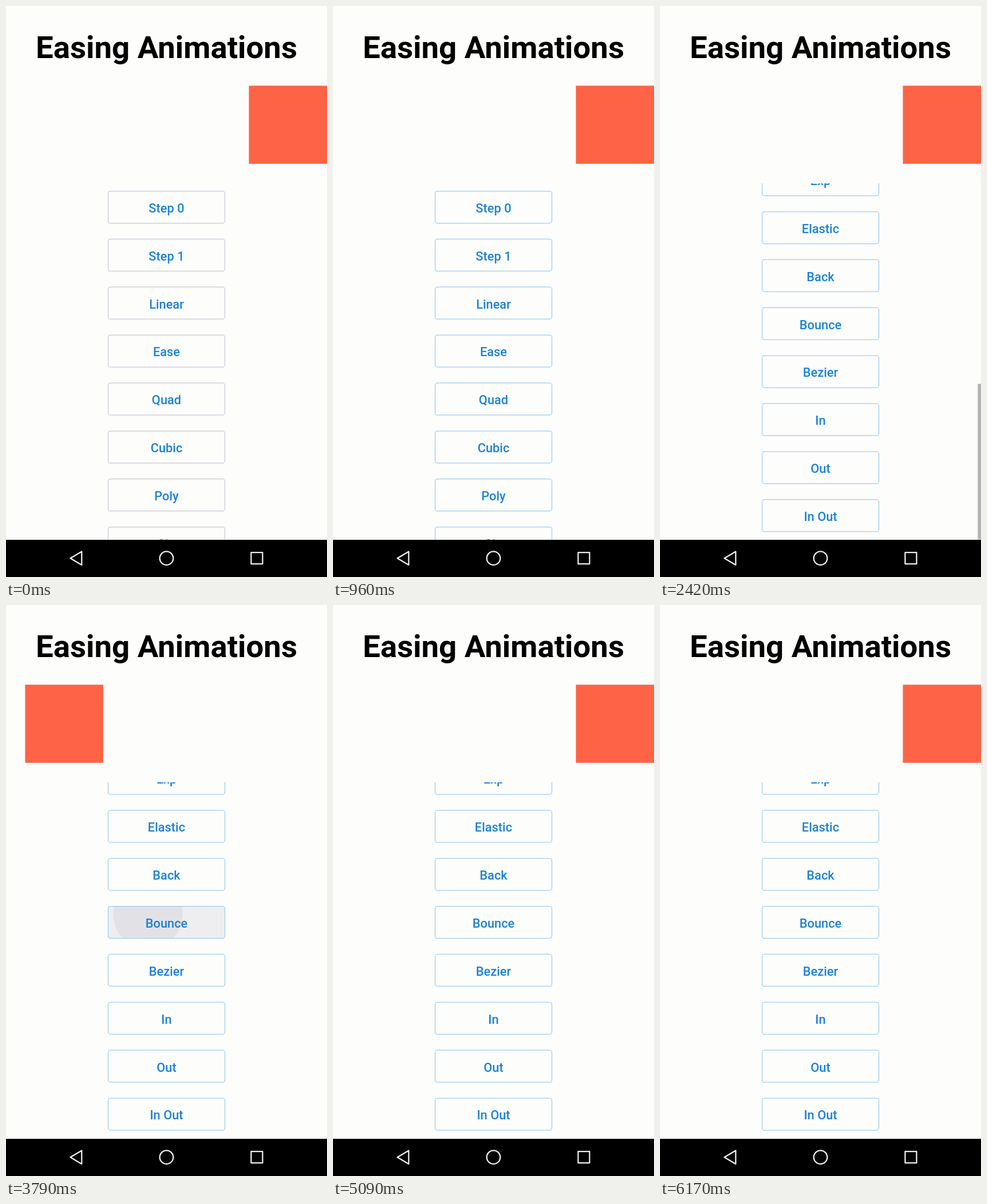
Animation, 561 px wide and 998 px high, one loop 6.21 s. Source, as an HTML page with a canvas:

```html
<!DOCTYPE html>
<html lang="en">
<head>
<meta charset="utf-8">
<title>Easing Animations</title>
<style>
html, body { margin: 0; width: 100%; height: 100%; overflow: hidden; background: #fdfdfc; }
canvas { display: block; width: 561px; height: 998px; }
</style>
</head>
<body>
<canvas id="stage" width="561" height="998"></canvas>
<script>
const ctx = document.getElementById('stage').getContext('2d');
const W = 561, H = 998, LOOP = 6210;
const LIST = { top: 310, bottom: 933, content: 1427, max: 803.2 };
const BUTTON = { x: 178, y: 323, w: 205, h: 57, pitch: 83.86, radius: 4 };
const BOX = { size: 136.5, y: 139.3, travel: 424.5, duration: 1000 };
const LABELS = ['Step 0', 'Step 1', 'Linear', 'Ease', 'Quad', 'Cubic', 'Poly', 'Sin',
  'Circle', 'Exp', 'Elastic', 'Back', 'Bounce', 'Bezier', 'In', 'Out', 'In Out'];

const clamp = v => Math.max(0, Math.min(1, v));
const progress = (t, from, to) => clamp((t - from) / (to - from));
const mix = (a, b, k) => a + (b - a) * k;
const smooth = k => k * k * (3 - 2 * k);
const easeOut = k => 1 - (1 - k) ** 3;

function bounce(k) {
  for (const [limit, shift, base] of [[1, 0, 0], [2, 1.5, 0.75], [2.5, 2.25, 0.9375]]) {
    if (k < limit / 2.75) return 7.5625 * (k - shift / 2.75) ** 2 + base;
  }
  return 7.5625 * (k - 2.625 / 2.75) ** 2 + 0.984375;
}

const elastic = k => 1 - Math.cos(k * Math.PI / 2) ** 3 * Math.cos(k * Math.PI);

const TAPS = [
  { label: 'Bounce', press: 3620, start: 3689, ease: bounce },
  { label: 'Elastic', press: 5100, start: 5138, ease: elastic }
];

function scrollAt(t) {
  if (t < 2210) return 420 * smooth(progress(t, 1420, 1960));
  return mix(420, 802.6, easeOut(progress(t, 2210, 2410))) +
    (LIST.max - 802.6) * progress(t, 2430, 2530);
}

function boxX(t) {
  const tap = TAPS.filter(item => t >= item.start).pop();
  return BOX.travel * (tap ? tap.ease(clamp((t - tap.start) / BOX.duration)) : 1);
}

function text(label, y, size, weight, color) {
  ctx.font = `${weight} ${size}px Roboto, sans-serif`;
  ctx.textAlign = 'center';
  ctx.fillStyle = color;
  ctx.fillText(label, W / 2, y);
}

function drawRipple(y, age) {
  const fade = 1 - progress(age, 190, 480);
  if (age < 0 || fade === 0) return;
  const reach = clamp(age / 400);
  ctx.save();
  ctx.clip();
  ctx.fillStyle = `rgba(60, 60, 110, ${0.075 * fade * progress(age, 0, 90)})`;
  ctx.fillRect(BUTTON.x, y, BUTTON.w, BUTTON.h);
  ctx.fillStyle = `rgba(60, 60, 80, ${0.065 * fade})`;
  ctx.beginPath();
  ctx.arc(mix(219, 287, reach), y + mix(6, 28, reach), mix(15, 121, reach), 0, Math.PI * 2);
  ctx.fill();
  ctx.restore();
}

function drawButton(label, y, t) {
  const settle = progress(t, 40, 630);
  ctx.beginPath();
  ctx.roundRect(BUTTON.x + 0.5, y + 0.5, BUTTON.w - 1, BUTTON.h - 1, BUTTON.radius);
  const tap = TAPS.find(item => item.label === label);
  if (tap) {
    drawRipple(y, t - tap.press);
    ctx.beginPath();
    ctx.roundRect(BUTTON.x + 0.5, y + 0.5, BUTTON.w - 1, BUTTON.h - 1, BUTTON.radius);
  }
  ctx.strokeStyle = `rgb(${mix(205, 160, settle)}, ${mix(198, 204, settle)}, ${mix(210, 239, settle)})`;
  ctx.lineWidth = 1.25;
  ctx.stroke();
  text(label, y + 37.8, 21.82, 500, '#1a82d7');
}

function drawList(t) {
  const scroll = scrollAt(t), view = LIST.bottom - LIST.top;
  ctx.save();
  ctx.beginPath();
  ctx.rect(0, LIST.top, W, view);
  ctx.clip();
  LABELS.forEach((label, i) => {
    const y = BUTTON.y + i * BUTTON.pitch - scroll;
    if (y < LIST.bottom && y + BUTTON.h > LIST.top) drawButton(label, y, t);
  });
  if (t >= 1420) {
    ctx.globalAlpha = 1 - progress(t, 2790, 3040);
    ctx.fillStyle = '#b4b4b1';
    ctx.fillRect(555.4, LIST.top + scroll * view / LIST.content, 5.6, view * view / LIST.content);
  }
  ctx.restore();
}

function drawNavigation() {
  ctx.fillStyle = '#000';
  ctx.fillRect(0, LIST.bottom, W, H - LIST.bottom);
  ctx.strokeStyle = '#ececea';
  ctx.lineWidth = 2.3;
  ctx.lineJoin = 'round';
  ctx.beginPath();
  ctx.moveTo(112.5, 965.2);
  ctx.lineTo(132.3, 953.5);
  ctx.lineTo(132.3, 976.9);
  ctx.closePath();
  ctx.moveTo(292.3, 965.2);
  ctx.arc(280.5, 965.2, 11.8, 0, Math.PI * 2);
  ctx.rect(428.4, 955.2, 20, 20);
  ctx.stroke();
}

function draw(t) {
  ctx.fillStyle = '#fdfdfc';
  ctx.fillRect(0, 0, W, H);
  text('Easing Animations', 91, 54.54, 700, '#000');
  ctx.fillStyle = '#ff6345';
  ctx.fillRect(boxX(t), BOX.y, BOX.size, BOX.size);
  drawList(t);
  drawNavigation();
}

const origin = performance.now();
function tick() {
  draw((performance.now() - origin) % LOOP);
  requestAnimationFrame(tick);
}
tick();
</script>
</body>
</html>
```
